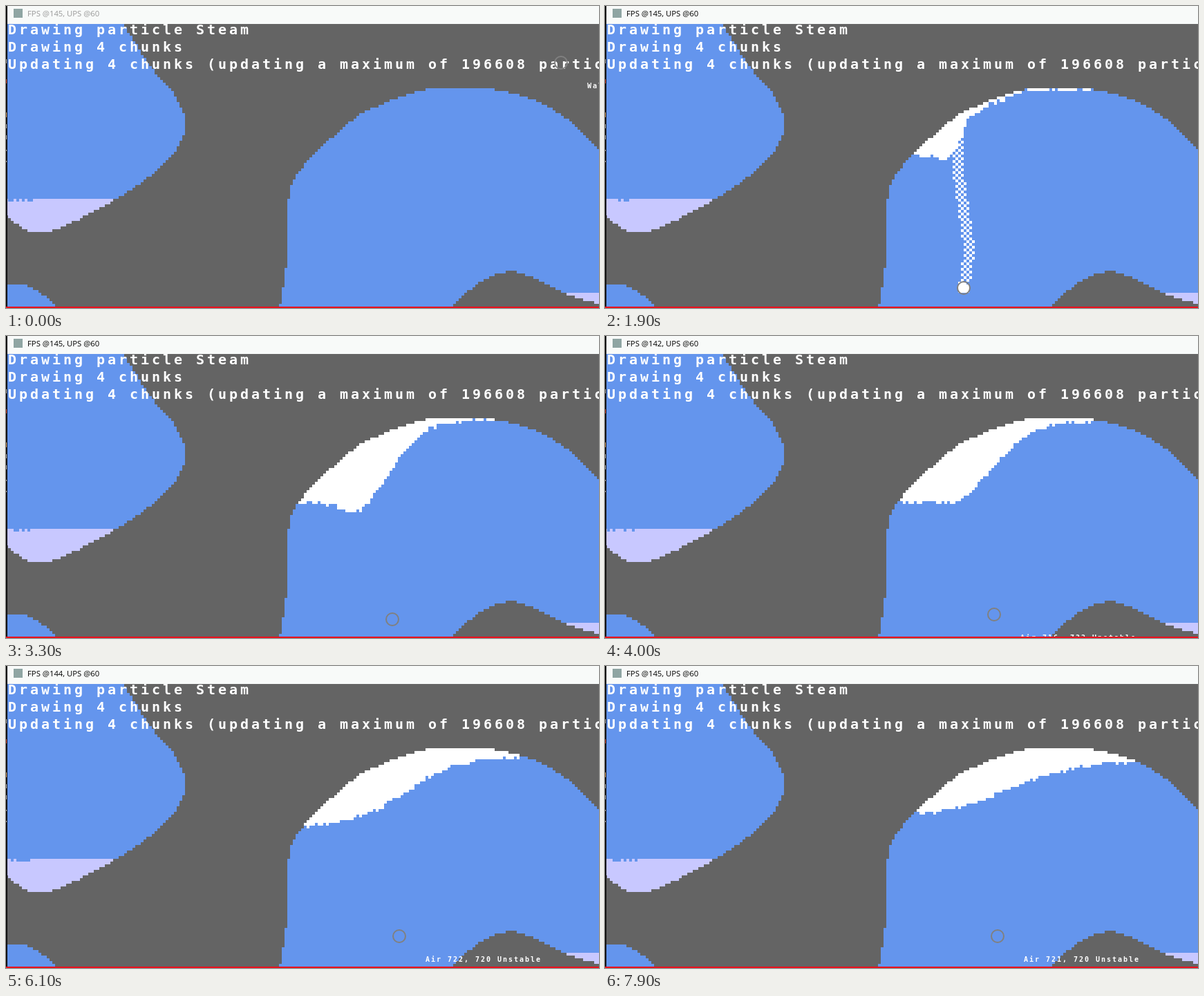
These frames come from a looping animation (858 px wide and 437 px high, 8 s). An HTML page with a canvas:

```html
<!DOCTYPE html>
<html lang="en">
<head>
<meta charset="utf-8">
<title>Steam particles</title>
<style>
  html, body { margin: 0; width: 858px; height: 437px; overflow: hidden; background: #646464; }
  canvas, svg { position: absolute; left: 0; top: 0; }
  .mono { font: bold 20px "DejaVu Sans Mono", monospace; letter-spacing: calc(16px - .602em); fill: #fff; }
  #label { font-size: 10px; letter-spacing: calc(8px - .602em); }
  #title { font: 11.3px "Open Sans", sans-serif; }
</style>
</head>
<body>
<canvas id="view" width="858" height="437"></canvas>
<svg width="858" height="437">
  <g class="mono">
    <text x="3" y="40.5">Drawing particle Steam</text>
    <text x="3" y="65.5">Drawing 4 chunks</text>
    <text x="3" y="90.5">Updating 4 chunks (updating a maximum of 196608 particles)</text>
  </g>
  <text id="label" class="mono"></text>
  <circle id="ring" r="9" fill="none" stroke="#808080" stroke-width="2"/>
  <rect width="858" height="26" fill="#f8faf9"/>
  <rect width="2" height="437" fill="#111"/>
  <path d="M.5 77v6M.5 171v6M.5 187v6M.5 208v2M.5 224v2" stroke="#aaa"/>
  <path d="M.5 106v6" stroke="#c43"/>
  <path d="M.5 154v7" stroke="#c96"/>
  <rect x="11" y="4" width="13" height="13" fill="#8fa5a3"/>
  <text id="title" x="31" y="15"></text>
  <rect y="435" width="858" height="2" fill="#e8101c"/>
</svg>
<script>
const $ = id => document.getElementById(id);
const ctx = $('view').getContext('2d');
const LOOP = 8000, STEP = 100, CELL = 4, COLS = 215, ROWS = 110;
const AIR = '#6495ed', WATER = '#c8c8ff', STEAM = '#fff', WALL = '#646464';
const EMIT_FROM = 1000, EMIT_TO = 2500, POOL_FROM = 1350, POOL_FULL = 3300;
const RISE = .48, SOURCE_Y = 409;

const center = i => i * CELL + 1;
const clamp = v => Math.min(1, Math.max(0, v));
const noise = (a, b) => {
  const n = Math.sin(a * 12.9898 + b * 78.233) * 43758.5453;
  return n - Math.floor(n);
};

// Smooth curve through "x,y x,y ...", as path data
function curve(text) {
  const p = text.split(' ').map(s => s.split(',').map(Number));
  const get = i => p[Math.min(p.length - 1, Math.max(0, i))];
  const handle = (i, side) => get(i).map((v, k) => v + side * (get(i + 1)[k] - get(i - 1)[k]) / 6);
  return p[0] + p.slice(1).map((q, i) => `C${handle(i, 1)} ${handle(i + 1, -1)} ${q}`).join('');
}

const basin = curve('166,20 211,90 240,122 258,160 258,184 240,217 199,253 155,282 103,310 67,325 35,326 10,311 -4,297');
const pocket = curve('-4,403 24,403 51,416 77,441');
const roof = curve('394,445 405,379 408,285 428,235 499,167 547,141 611,120 657,119.5 703,120 763,136 815,166 866,216');
const hill = curve('866,433 811,417 779,401 731,384 683,402 636,445');
const dome = new Path2D(`M${roof}L${hill}Z`);
const lairs = new Path2D(`M${basin}L-4,20ZM${pocket}L-4,441Z`);
const inDome = (x, y) => ctx.isPointInPath(dome, x, y);
const inCave = (x, y) => inDome(x, y) || ctx.isPointInPath(lairs, x, y);

// Time, x, y
const cursorPath = [
  [0, 803, 82], [900, 505, 378], [1050, 510, 409], [1550, 511, 409], [1780, 527, 409], [1900, 519, 408],
  [2400, 594, 404], [2700, 560, 410], [3300, 559, 410], [4800, 567, 394], [5300, 569, 391], [7900, 568, 391]
];
function cursorAt(t) {
  const i = Math.max(1, cursorPath.findIndex(k => k[0] >= t));
  const [a, b] = [cursorPath[i - 1], cursorPath[i]];
  const u = clamp((t - a[0]) / (b[0] - a[0]));
  return [1, 2].map(k => a[k] + (b[k] - a[k]) * u);
}
const fpsPerSecond = [142, 145, 145, 145, 142, 145, 144, 145];

// Static terrain
const terrain = document.createElement('canvas');
terrain.width = 858;
terrain.height = 437;
const land = terrain.getContext('2d');
land.fillStyle = WALL;
land.fillRect(0, 0, 858, 437);
const cell = (c, col, row) => c.fillRect(col * CELL - 1, row * CELL - 1, CELL, CELL);
const ceiling = [];
for (let col = 0; col < COLS; col++) {
  const x = center(col);
  for (let row = 6; row < ROWS; row++) {
    const y = center(row);
    if (!inCave(x, y)) continue;
    if (inDome(x, y)) ceiling[col] ??= row * CELL - 1;
    const wet = x < 300 ? y > 279 && y < 340 : x > 780 && y > 415;
    land.fillStyle = wet ? WATER : AIR;
    cell(land, col, row);
  }
}

// Lower edge of the trapped steam: a soft step that fills up, then levels out
function poolEdge(col, t) {
  const top = ceiling[col], x = center(col);
  if (t < POOL_FROM) return top;
  const fill = clamp((t - POOL_FROM) / (POOL_FULL - POOL_FROM));
  const settle = clamp((t - POOL_FULL) / (7900 - POOL_FULL));
  const left = 185 + 57 * Math.sqrt(fill) - 23 * settle ** 2;
  const right = 122 + 15 * settle;
  const middle = 497 + 69 * fill + 20 * settle;
  const width = 6 + 16 * fill + 28 * settle;
  const sag = 20 * Math.exp(-6 * settle - ((x - 508) / 30) ** 2);
  const film = x > 505 ? top + (620 - x) / 8 : top;
  const edge = Math.max(film, right + (left - right) / (1 + Math.exp((x - middle) / width)) + sag);
  return edge > top + 2 ? edge + (noise(col, t / STEP) - .5) * 5 : top;
}

function inPlume(x, y, t) {
  const born = t - (SOURCE_Y - y) / RISE;
  return y < SOURCE_Y && born > EMIT_FROM && born < Math.min(t, EMIT_TO) &&
    Math.abs(x - cursorAt(born)[0]) < 8;
}

function draw(t) {
  const [cx, cy] = cursorAt(t).map(Math.round);
  const emitting = t >= EMIT_FROM && t < EMIT_TO;
  ctx.drawImage(terrain, 0, 0);

  // Restless water surface
  ctx.fillStyle = AIR;
  const reach = 8 + 10 * noise(t / STEP, 3);
  for (let col = 1; col < reach; col++) if (noise(col, t / STEP + 9) < .5) cell(ctx, col, 70);

  ctx.fillStyle = STEAM;
  for (let col = 100; col < 195; col++) {
    if (ceiling[col] === undefined) continue;
    const x = center(col), edge = poolEdge(col, t);
    for (let row = (ceiling[col] + 1) / CELL; row < 105; row++) {
      const y = center(row);
      const brush = emitting && Math.hypot(x - cx, y - cy) < 9;
      const plume = (col + row) % 2 === 0 && inPlume(x, y, t);
      if (y < edge || brush || plume) cell(ctx, col, row);
    }
  }

  $('ring').setAttribute('cx', cx);
  $('ring').setAttribute('cy', cy);
  const label = $('label');
  label.setAttribute('x', cx + 38);
  label.setAttribute('y', cy + 37);
  label.style.display = cy < 408 ? '' : 'none';
  const [name, state] = inCave(cx, cy) ? ['Air', 'Unstable'] : ['Wall', 'Stable'];
  label.textContent = `${name} ${cx + 153}, ${cy + 329} ${state}`;

  const fps = t ? fpsPerSecond[Math.floor(t / 1000)] : 145;
  $('title').textContent = `FPS @${fps}, UPS @60`;
  $('title').style.fill = t < 600 ? '#999' : '#000';
}

const start = performance.now();
let shown = -1;
function tick() {
  const t = Math.floor((performance.now() - start) % LOOP / STEP) * STEP;
  if (t !== shown) draw(shown = t);
  requestAnimationFrame(tick);
}
tick();
</script>
</body>
</html>
```
